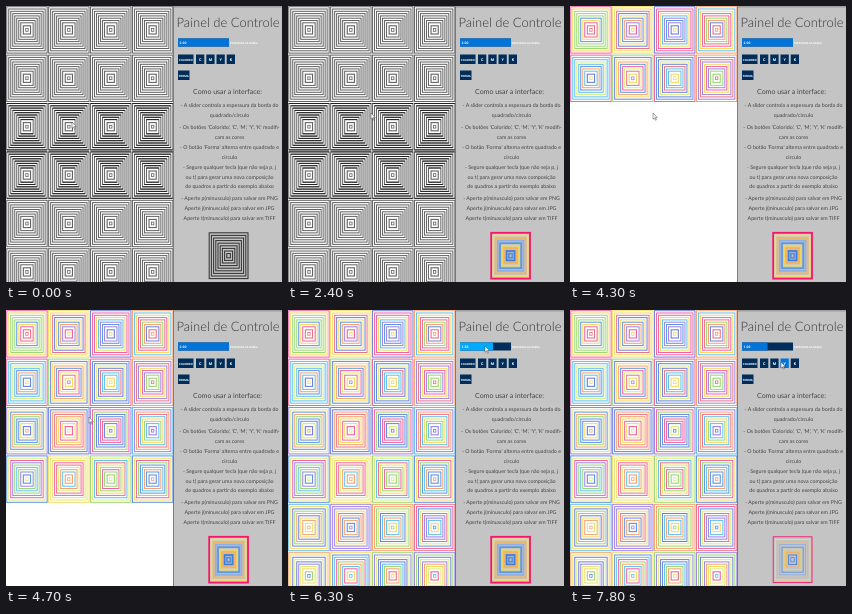
These frames come from a looping animation (276 by 276 pixels, 8 s). An HTML page:

```html
<!DOCTYPE html>
<html lang="pt">
<head>
<meta charset="utf-8">
<title>Painel de Controle</title>
<style>
html, body { margin: 0; width: 100%; height: 100%; overflow: hidden; background: #fff; }
svg { display: block; width: 100vw; height: 100vh; }
text { font-family: Lato, "Open Sans", sans-serif; text-rendering: geometricPrecision; }
.mid { text-anchor: middle; }
.ui { font: 700 3.4px Roboto, Inter, sans-serif; fill: #fff; }
</style>
</head>
<body>
<svg id="stage" viewBox="0 0 276 276"></svg>
<script>
const LOOP = 8000;
const NAVY = '#002d5a', BLUE = '#0074d9', BRIGHT = '#00aaff';
const stage = document.getElementById('stage');

function el(tag, attrs, parent = stage, content) {
  const node = document.createElementNS('http://www.w3.org/2000/svg', tag);
  for (const key in attrs) node.setAttribute(key, attrs[key]);
  if (content) node.textContent = content;
  return parent.appendChild(node);
}
const box = (x, y, width, height, fill) => el('rect', { x, y, width, height, fill });
const label = (x, y, size, content, fill = '#444') =>
  el('text', { x, y, class: 'mid', 'font-size': size, fill }, stage, content);

function ring(cx, cy, rx, ry, stroke, weight, parent) {
  return el('rect', {
    x: cx - rx, y: cy - ry, width: 2 * rx, height: 2 * ry,
    fill: 'none', stroke, 'stroke-width': weight
  }, parent);
}

let seed = 2024;
const random = () => (seed = seed * 16807 % 2147483647) / 2147483647;

// Left side: four columns, six rows of nested frames
const PALETTE = ['#f2629f', '#5c93e3', '#f5da62', '#9bd873', '#f5a26e', '#9c83e2', '#5fc0ee', '#dcec7c', '#ea7283', '#6a80dc'];
const pick = () => PALETTE[Math.floor(random() * PALETTE.length)];
const COL = 41.9, ROW = 48.4, RINGS = 8;
const ringX = i => 20.2 - 2 * i, ringY = i => 23.2 - 2.3 * i;

function tile(cx, cy, parent, color) {
  for (let i = 0; i < RINGS; i++) ring(cx, cy, ringX(i), ringY(i), color(), 1, parent);
  ring(cx, cy, 3.6, 4.1, color(), 1.1, parent);
  ring(cx, cy, 1.2, 1.4, color(), 0.8, parent);
}

// Darker top and bottom edges
function bars(cx, cy, parent) {
  let d = '';
  for (let i = 0; i < RINGS; i++)
    for (const side of [-1, 1]) d += `M${cx - ringX(i)} ${cy + side * ringY(i)}h${2 * ringX(i)}`;
  el('path', { d, stroke: '#222', 'stroke-width': 1 }, parent);
}

function grid(drawTile) {
  return Array.from({ length: 6 }, (_, r) => {
    const g = el('g', {});
    for (let c = 0; c < 4; c++) drawTile(COL * (c + 0.5), 23.9 + ROW * r, g, r);
    return g;
  });
}
const plainRows = grid((x, y, g, r) => {
  tile(x, y, g, () => '#626262');
  if (r === 2 || r === 3) bars(x, y, g);
});
const colorRows = grid((x, y, g) => tile(x, y, g, pick));
const ROW_TIMES = [4000, 4300, 4500, 4700, 4900, 5000];

// Panel
el('rect', { x: 167.4, y: 0.8, width: 110, height: 276, fill: '#c4c4c4', stroke: '#666', 'stroke-width': 0.8 });
label(222, 20.8, 13, 'Painel de Controle', '#333').setAttribute('font-weight', 300);
box(172, 32.5, 51, 8, NAVY);
const fill = box(172, 32.5, 51, 8, BLUE);
const value = el('text', { x: 173.5, y: 37.8, class: 'ui' });
el('text', { x: 224, y: 37.8, class: 'ui', style: 'font-size:2.6px' }, stage, 'ESPESSURA DA BORDA');

const buttons = [
  [172, 48.5, 15.5, 'COLORIDO'], [190, 48.5, 8.3, 'C'], [200.3, 48.5, 8.3, 'M'],
  [210.5, 48.5, 8.3, 'Y'], [220.7, 48.5, 8.3, 'K'], [172, 64.5, 11.5, 'FORMA']
].map(([x, y, w, name]) => {
  const node = box(x, y, w, 9.5, NAVY);
  const size = name.length > 1 ? 2.9 : 3.8;
  el('text', { x: x + w / 2, y: y + 6, class: 'ui mid', style: `font-size:${size}px` }, stage, name);
  return { x, y, w, node };
});

label(221.5, 88, 7, 'Como usar a interface:');
[
  [101, '- A slider controla a espessura da borda do'],
  [111, 'quadrado/circulo'],
  [123, "- Os botões 'Colorido', 'C', 'M', 'Y', 'K' modifi-"],
  [133, 'cam as cores'],
  [143, "- O botão 'Forma' alterna entre quadrado e"],
  [153, 'circulo'],
  [163, '- Segure qualquer tecla (que não seja p, j'],
  [172.5, 'ou t) para gerar uma nova composição'],
  [182, 'de quadros a partir do exemplo abaixo'],
  [194, '- Aperte p(minusculo) para salvar em PNG'],
  [204, 'Aperte j(minusculo) para salvar em JPG'],
  [213.5, 'Aperte t(minusculo) para salvar em TIFF']
].forEach(([y, line]) => label(223.5, y, 5.3, line));

// Sample figure
const SAMPLE = ['#f5146e', '#f3d878', '#efb765', '#8fb0e4', '#5f97e0', '#efd65c', '#f0b268', '#3f7fdc', '#5a8fda'];
const sample = SAMPLE.map((color, i) => ring(222.6, 249.7, 19.4 - 2.2 * i, 22.9 - 2.6 * i, color, 1));

const pointer = el('path', {
  d: 'M0 0V6.2L1.5 4.9L2.5 7.2L3.4 6.8L2.4 4.6H4.3Z',
  fill: '#fff', stroke: '#444', 'stroke-width': 0.5
});

// Tables of [time, ...values], linear in between
const POINTER = [
  [0, 66, 116], [200, 66, 116], [400, 134, 114], [800, 134, 114], [1500, 180, 53],
  [2100, 180, 53], [2400, 83, 107], [4900, 83, 107], [5100, 173, 77],
  [5700, 220, 36], [5800, 218, 36], [6300, 197, 36], [6600, 196, 37],
  [7000, 202, 56], [7200, 202, 56], [7800, 211, 52], [8000, 211, 52]
];
const THICKNESS = [[0, 2], [5800, 2], [6300, 1.3], [6400, 1], [8000, 1]];

function at(table, t) {
  const n = table.findIndex(step => step[0] > t);
  const [a, b] = [table[n - 1], table[n]];
  const k = (t - a[0]) / (b[0] - a[0]);
  return a.slice(1).map((v, i) => v + (b[i + 1] - v) * k);
}
const show = (node, on) => node.setAttribute('visibility', on ? 'visible' : 'hidden');

function draw(t) {
  plainRows.forEach(g => show(g, t < 3800));
  colorRows.forEach((g, r) => show(g, t >= ROW_TIMES[r]));

  const [x, y] = at(POINTER, t);
  pointer.setAttribute('transform', `translate(${x} ${y})`);
  for (const b of buttons) {
    const over = x >= b.x && x <= b.x + b.w && y >= b.y && y <= b.y + 9.5;
    b.node.setAttribute('fill', over ? BLUE : NAVY);
  }

  const [thick] = at(THICKNESS, t);
  fill.setAttribute('width', thick * 25.5);
  fill.setAttribute('fill', t >= 5700 && t < 6600 ? BRIGHT : BLUE);
  value.textContent = thick.toFixed(2);

  // The sample is redrawn thinner only once the slider is released
  const colored = t >= 2100;
  const weight = !colored ? 1.05 : t < 6600 ? 1.8 : 0.9;
  sample.forEach((node, i) => {
    node.setAttribute('stroke', colored ? SAMPLE[i] : '#333');
    node.setAttribute('stroke-width', weight);
  });
}

const start = performance.now();
function tick() {
  draw((performance.now() - start) % LOOP);
  requestAnimationFrame(tick);
}
tick();
</script>
</body>
</html>
```
